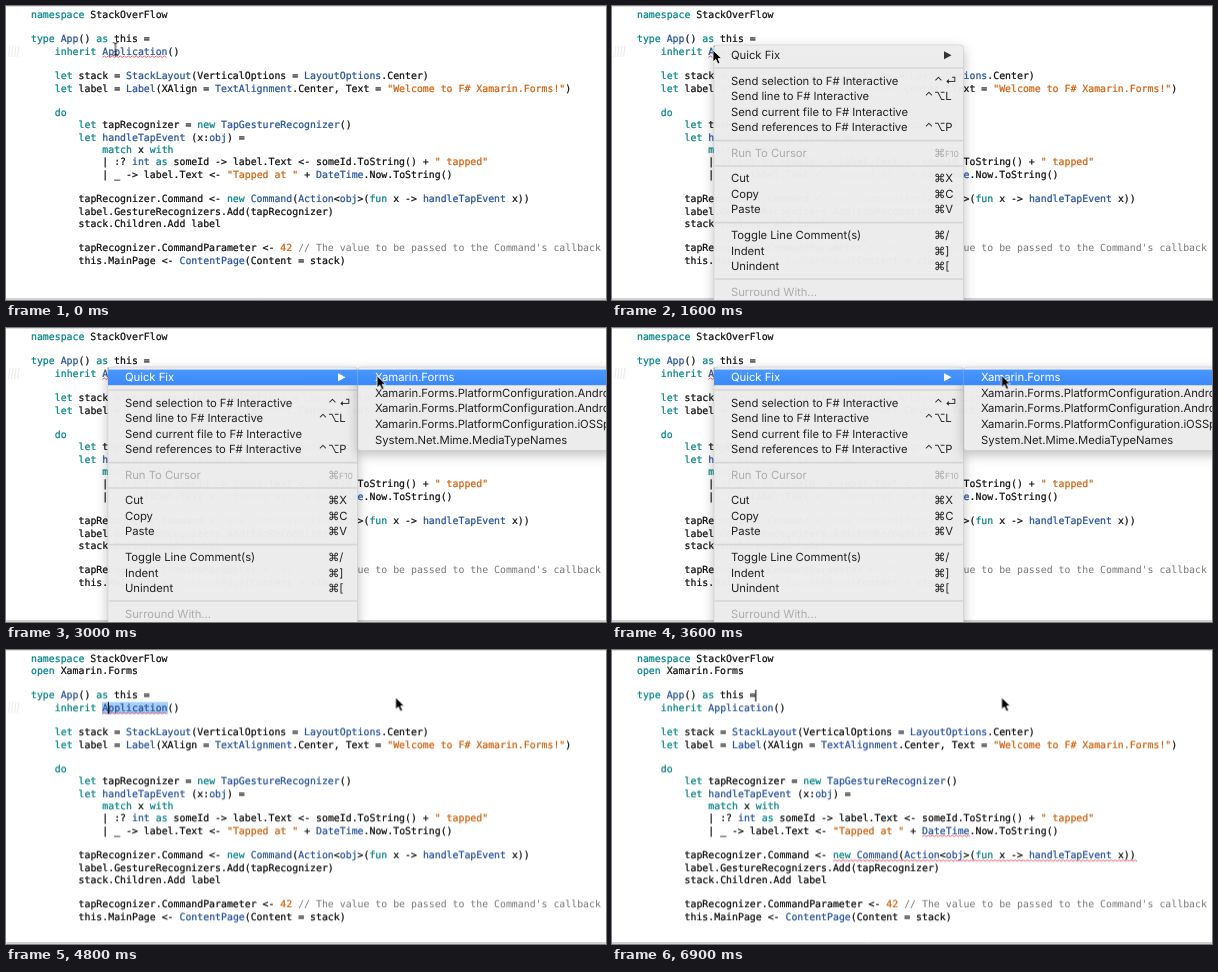
These frames come from a looping animation (600x294 px, 7 s). An HTML page:

```html
<!DOCTYPE html>
<html lang="en">
<head>
<meta charset="utf-8">
<title>Quick fix</title>
<style>
html, body { margin: 0; width: 100%; height: 100%; overflow: hidden; background: #fff; }
svg { display: block; width: 600px; height: 294px; text-rendering: geometricPrecision; }

.code { font: 9.87px "DejaVu Sans Mono", monospace; }
.code text, .code tspan { fill: currentColor; stroke: currentColor; stroke-width: .22; }
.code text { color: #0c0c0c; }
.code .key { color: #008287; }
.code .type { color: #24509a; }
.code .lit { color: #cf5f0c; }
.code .note { color: #757575; stroke-width: 0; }
.wave { fill: none; stroke: #e8545c; stroke-width: .9; }

.menu { font: 11.3px Inter, "DejaVu Sans", sans-serif; letter-spacing: -.04px; fill: #202020; }
.panel { fill: #ededed; fill-opacity: .975; stroke: #c4c4c4; stroke-width: .5; filter: drop-shadow(0 4px 6px #0004); }
.rule { stroke: #d6d6d6; stroke-width: 1.6; }
.menu .off { fill: #acacac; }
.menu .on { fill: #fff; }

/* every part shares one seven second clock */
.a { animation: 7s step-end infinite; }
#body { animation-name: body; }
#open { animation-name: open; }
#pick { animation-name: pick; }
#error { animation-name: error; }
#gutter { animation-name: gutter; }
#caret { animation-name: caret; }
#late { animation-name: late; }
#menu { animation-name: menu; }
#fix { animation-name: fix; }
#sub { animation-name: sub; }
#first { animation-name: first; }
#beam { animation-name: beam; }
#arrow { animation-name: arrow; }

@keyframes body { 0% { transform: none; } 64.2857%, 100% { transform: translateY(12.3px); } }
@keyframes open { 0% { opacity: 0; } 64.2857%, 100% { opacity: 1; } }
@keyframes pick { 0% { opacity: 0; } 65.7143% { opacity: 1; } 75.7143%, 100% { opacity: 0; } }
@keyframes error { 0% { opacity: 1; } 75.7143%, 100% { opacity: 0; } }
@keyframes gutter { 0% { opacity: 1; } 82.8571%, 100% { opacity: 0; } }
@keyframes caret {
  0% { opacity: 0; transform: none; }
  20% { opacity: 1; transform: none; }
  82.8571%, 100% { opacity: 1; transform: translate(41.4px, -12.3px); }
}
@keyframes late { 0% { opacity: 0; } 92.8571%, 100% { opacity: 1; } }
@keyframes menu { 0% { opacity: 0; } 20% { opacity: 1; } 54.2857% { opacity: .5; } 55.7143%, 100% { opacity: 0; } }
@keyframes fix { 0% { opacity: 0; } 25.7143%, 100% { opacity: 1; } }
@keyframes sub { 0% { opacity: 0; } 28.5714%, 100% { opacity: 1; } }
@keyframes first { 0% { opacity: 0; } 41.4286% { opacity: 1; } 52.8571% { opacity: 0; } 54.2857%, 100% { opacity: 1; } }
@keyframes beam {
  0% { opacity: 1; transform: translate(109.5px, 43px); }
  12.8571% { opacity: 1; transform: translate(106px, 44px); }
  14.2857% { opacity: 1; transform: translate(103px, 45px); }
  15.7143%, 100% { opacity: 0; transform: translate(101px, 45px); }
}
@keyframes arrow {
  0% { opacity: 0; transform: translate(101px, 44px); }
  15.7143% { opacity: 1; transform: translate(101px, 44px); }
  24.2857% { opacity: 1; transform: translate(101px, 44px); animation-timing-function: steps(5); }
  31.4286% { opacity: 1; transform: translate(278.6px, 49.2px); }
  35.7143% { opacity: 1; transform: translate(278.6px, 49.2px); animation-timing-function: steps(6); }
  44.2857%, 100% { opacity: 1; transform: translate(389.6px, 47.4px); }
}
</style>
</head>
<body>
<svg viewBox="0 0 600 294">
  <defs>
    <linearGradient id="blue" x2="0" y2="1">
      <stop stop-color="#4a97fc"/><stop offset="1" stop-color="#3b88fb"/>
    </linearGradient>
  </defs>
  <rect width="600" height="294" fill="#fff"/>
  <path d="M0 .5H600" stroke="#ddd"/>
  <g id="head" class="code"></g>
  <g id="body" class="code a">
    <path id="gutter" class="a" d="M2.5 51l1.5-11M5.5 51l1.5-11M8.5 51l1.5-11M11.5 51l1.5-11" stroke="#ececec" stroke-width="1.2"/>
    <rect id="pick" class="a" x="96" y="39.7" width="66" height="12" fill="#a2d0fa"/>
    <g id="lines"></g>
    <path id="error" class="wave a"/>
    <path id="late" class="wave a"/>
    <path id="caret" class="a" d="M102.4 39.8v11.6" stroke="#000" stroke-width="1.1"/>
  </g>
  <path d="M0 293H600" stroke="#a5a5a5"/>
  <g id="menu" class="menu a">
    <rect class="panel" x="102" y="39" width="249.5" height="275" rx="3"/>
    <g id="items"></g>
    <g id="sub" class="a">
      <rect class="panel" x="352" y="39" width="270" height="83.5" rx="3"/>
      <g id="choices"></g>
      <g id="first" class="a"></g>
    </g>
    <g id="fix" class="a"></g>
  </g>
  <path id="beam" class="a" fill="none" stroke="#222"
    d="M-2.5-6.5Q0-6.5 0-4.5Q0-6.5 2.5-6.5M0-4.5V4.5M-2.5 6.5Q0 6.5 0 4.5Q0 6.5 2.5 6.5M-1.3 2.5H1.3"/>
  <path id="arrow" class="a" d="M0 0V12L2.8 9.4L4.8 14L7 13L5 8.6H8.7Z" fill="#000" stroke="#fff" stroke-width=".8"/>
</svg>
<script>
const LEFT = 25, CHAR = 5.943, LINE = 12.3;
const $ = id => document.getElementById(id);
const esc = s => s.replace(/&/g, "&amp;").replace(/</g, "&lt;").replace(/>/g, "&gt;");
const colX = col => LEFT + col * CHAR;
const lineY = row => 11.7 + row * LINE;

const KEYS = "namespace|open|type|as|inherit|let|do|match|with|new|fun";
const TYPES = "App|Application|StackLayout|LayoutOptions|Label|TextAlignment|" +
  "TapGestureRecognizer|DateTime|Command|Action|ContentPage|obj|int|handleTapEvent";
const TOKEN = new RegExp(`("[^"]*"|//.*|\\b42\\b|\\b(?:${KEYS})\\b|(?<!\\.)\\b(?:${TYPES})\\b)`);
const isKey = new RegExp(`^(${KEYS})$`);

function kind(word) {
  if (word.startsWith("//")) return "note";
  if (/^["\d]/.test(word)) return "lit";
  return isKey.test(word) ? "key" : "type";
}

function codeLine(src, row, attrs = "") {
  const text = src.trimStart();
  const spans = text.split(TOKEN)
    .map((s, i) => i % 2 ? `<tspan class="${kind(s)}">${esc(s)}</tspan>` : esc(s)).join("");
  return `<text x="${colX(src.length - text.length)}" y="${lineY(row)}" ${attrs}>${spans}</text>`;
}

function wave(from, to, row) {
  const n = Math.round((to - from) * CHAR / 4);
  return `M${colX(from)} ${lineY(row) + 2.8}` + "l2-1.4l2 1.4".repeat(n);
}

const source = `type App() as this =
    inherit Application()

    let stack = StackLayout(VerticalOptions = LayoutOptions.Center)
    let label = Label(XAlign = TextAlignment.Center, Text = "Welcome to F# Xamarin.Forms!")

    do
        let tapRecognizer = new TapGestureRecognizer()
        let handleTapEvent (x:obj) =
            match x with
            | :? int as someId -> label.Text <- someId.ToString() + " tapped"
            | _ -> label.Text <- "Tapped at " + DateTime.Now.ToString()

        tapRecognizer.Command <- new Command(Action<obj>(fun x -> handleTapEvent x))
        label.GestureRecognizers.Add(tapRecognizer)
        stack.Children.Add label

        tapRecognizer.CommandParameter <- 42 // The value to be passed to the Command's callback
        this.MainPage <- ContentPage(Content = stack)`;

$("head").innerHTML = codeLine("namespace StackOverFlow", 0) +
  codeLine("open Xamarin.Forms", 1, 'id="open" class="a"');
$("lines").innerHTML = source.split("\n").map((s, i) => s && codeLine(s, i + 2)).join("");
$("error").setAttribute("d", wave(12, 23, 3));
$("late").setAttribute("d", wave(48, 56, 13) + wave(33, 84, 15));

const label = (x, y, s, cls = "") => `<text class="${cls}" x="${x}" y="${y + 3.6}">${s}</text>`;
const bar = (x, w) => `<rect x="${x}" y="41.6" width="${w}" height="15.6" fill="url(#blue)"/>`;

// centre of the row, caption, shortcut keys
const items = [
  [49.5, "Quick Fix", ""],
  [75, "Send selection to F# Interactive", "⌃⏎"],
  [90.5, "Send line to F# Interactive", "⌃⌥L"],
  [106, "Send current file to F# Interactive", ""],
  [121.7, "Send references to F# Interactive", "⌃⌥P"],
  [147.3, "Run To Cursor", "⌘", "off"],
  [172.5, "Cut", "⌘X"],
  [188, "Copy", "⌘C"],
  [203.6, "Paste", "⌘V"],
  [229.4, "Toggle Line Comment(s)", "⌘/"],
  [245, "Indent", "⌘]"],
  [260.6, "Unindent", "⌘["],
  [286, "Surround With...", "", "off"]
];

function shortcut(y, keys, cls) {
  const cols = cls ? [322] : [312.5, 322, 333.3].slice(-keys.length);
  return [...keys].map((k, i) => label(cols[i], y, k, cls)).join("");
}

const arrowHead = fill => `<path d="M332 45.2l7.5 4l-7.5 4z" fill="${fill}"/>`;

$("items").innerHTML =
  items.map(([y, s, keys, cls = ""]) => label(119, y, s, cls) + shortcut(y, keys, cls)).join("") +
  '<text class="off" x="333" y="150.9" font-size="8.5">F10</text>' + arrowHead("#333") +
  [62, 134.6, 160, 216.6, 273].map(y => `<path class="rule" d="M102.5 ${y}H351"/>`).join("");
$("fix").innerHTML = bar(102, 249.7) + label(119, 49.5, "Quick Fix", "on") + arrowHead("#fff");

const forms = "Xamarin.Forms", config = forms + ".PlatformConfiguration.";
$("choices").innerHTML = [
  forms, config + "AndroidSpecific", config + "AndroidSpecific.AppCompat",
  config + "iOSSpecific", "System.Net.Mime.MediaTypeNames"
].map((s, i) => label(369, 49.5 + i * 15.6, s)).join("");
$("first").innerHTML = bar(352, 250) + label(369, 49.5, forms, "on");
</script>
</body>
</html>
```
